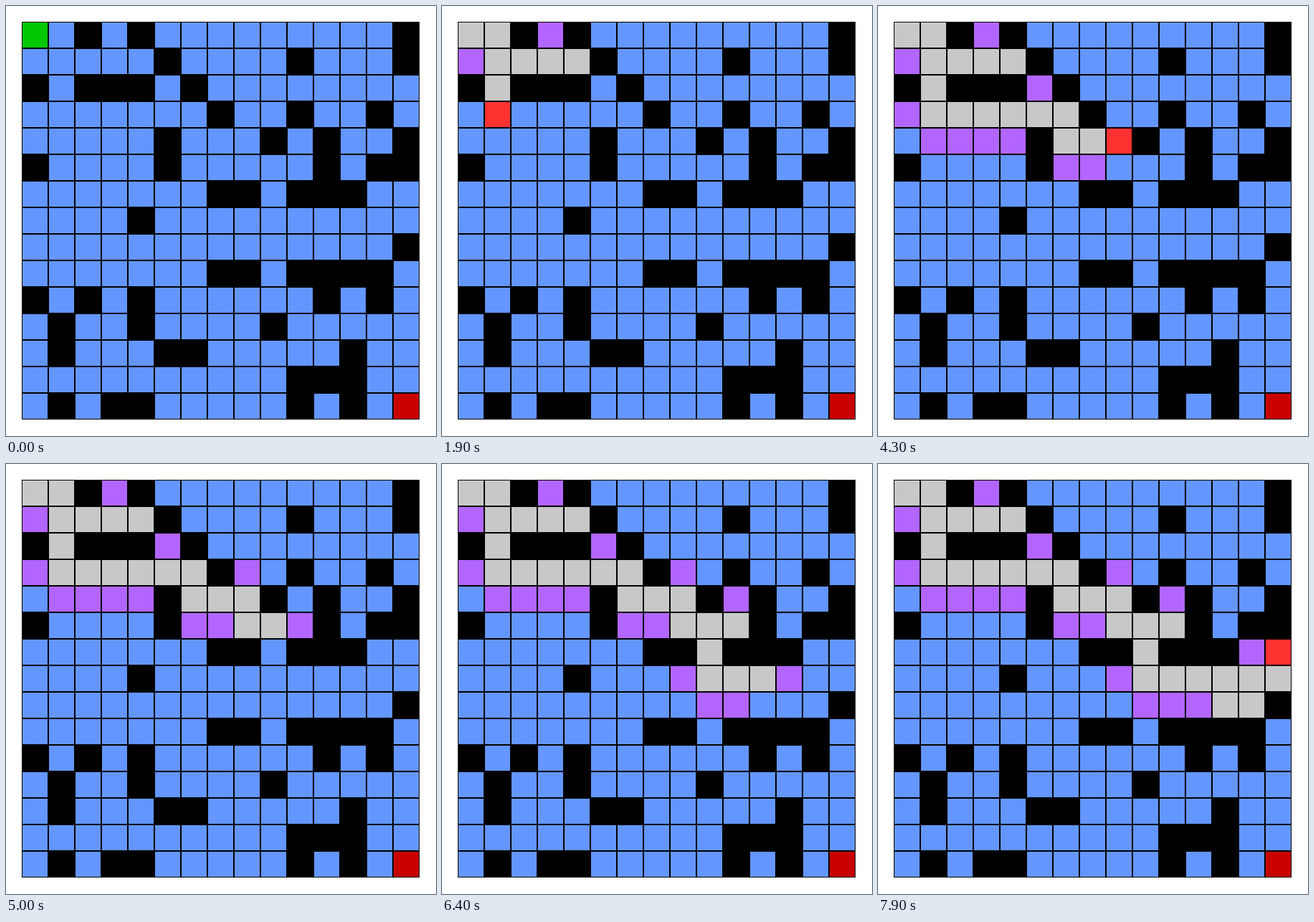
These frames come from a looping animation (600x600 px, 8000 ms). A matplotlib script:

```python
"""Greedy best-first search exploring a grid maze."""
from itertools import islice

import matplotlib.pyplot as plt
from matplotlib.animation import FuncAnimation
from matplotlib.patches import Rectangle

SIZE, DPI = 600, 100
FRAMES, INTERVAL = 80, 100
MARGIN, CELL = 22, 37

MAZE = [
    "..#.#.........#",
    ".....#....#...#",
    "#.###.#........",
    ".......#..#..#.",
    ".....#...#.#..#",
    "#....#.....#.##",
    ".......##.###..",
    "....#..........",
    "..............#",
    ".......##.####.",
    "#.#.#......#.#.",
    ".#..#....#.....",
    ".#...##.....#..",
    "..........###..",
    ".#.##.....#.#..",
]
N = len(MAZE)
START, GOAL = (0, 0), (N - 1, N - 1)
STEPS = [(0, 1), (0, -1), (1, 0), (-1, 0)]  # right, left, down, up

FREE, OPEN, CURRENT, CLOSED = "#6496ff", "#b266ff", "#ff3232", "#c8c8c8"
START_COLOR, GOAL_COLOR = "#00c800", "#c80000"


def is_free(cell):
    r, c = cell
    return 0 <= r < N and 0 <= c < N and MAZE[r][c] == "."


def distance(cell):
    return abs(GOAL[0] - cell[0]) + abs(GOAL[1] - cell[1])


def search():
    """Yield the cell colours after every step of the search."""
    colors = {START: START_COLOR, GOAL: GOAL_COLOR}
    yield dict(colors)
    queue, closed = [START], set()
    colors[START] = OPEN
    yield dict(colors)
    while queue:
        cell = min(queue, key=distance)  # ties go to the oldest entry
        queue.remove(cell)
        closed.add(cell)
        colors[cell] = CURRENT
        yield dict(colors)
        colors[cell] = CLOSED
        for dr, dc in STEPS:
            near = cell[0] + dr, cell[1] + dc
            if not is_free(near) or near in closed:
                continue
            if near not in queue:
                queue.append(near)
            colors[near] = OPEN
            yield dict(colors)


history = list(islice(search(), FRAMES))

fig = plt.figure(figsize=(SIZE / DPI, SIZE / DPI), dpi=DPI, facecolor="white")
ax = fig.add_axes([0, 0, 1, 1])
ax.set_xlim(0, SIZE)
ax.set_ylim(SIZE, 0)
ax.axis("off")

# Black board: walls and grid lines are what the tiles leave uncovered.
ax.add_patch(Rectangle((MARGIN, MARGIN), N * CELL, N * CELL, color="black", lw=0))

tiles = {}
for r in range(N):
    for c in range(N):
        if is_free((r, c)):
            corner = (MARGIN + c * CELL + 1, MARGIN + r * CELL + 1)
            tile = Rectangle(corner, CELL - 2, CELL - 2, facecolor=FREE, lw=0)
            tiles[r, c] = ax.add_patch(tile)


def update(i):
    for cell, tile in tiles.items():
        tile.set_facecolor(history[i].get(cell, FREE))
    return list(tiles.values())


anim = FuncAnimation(fig, update, frames=FRAMES, interval=INTERVAL,
                     repeat=True, repeat_delay=0)
plt.show()
```
